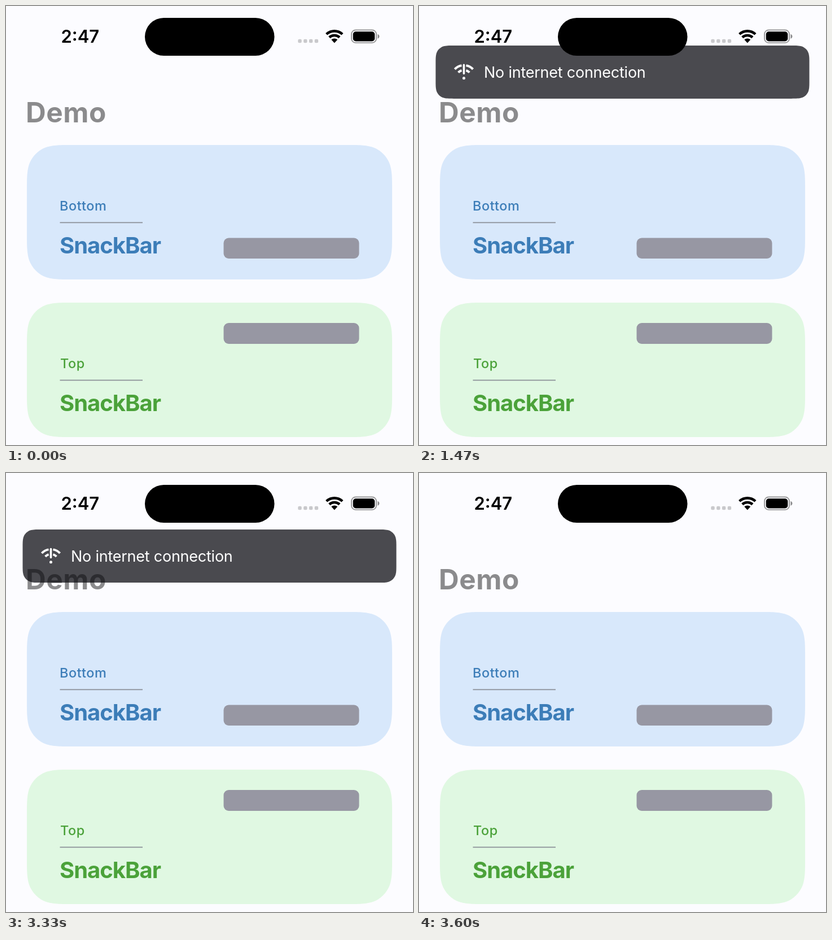
Recreate the animation shown at these times as an HTML page. Size 721 by 777 pixels, loop 3670 ms.

```html
<!DOCTYPE html>
<html lang="en">
<head>
<meta charset="utf-8">
<title>SnackBar demo</title>
<style>
  html, body { margin: 0; width: 100%; height: 100%; overflow: hidden; background: #fcfcff; }
  svg { display: block; width: 721px; height: 777px; font-family: Inter, Roboto, sans-serif; }
  .title { font-size: 49.5px; font-weight: 700; letter-spacing: .5px; fill: #8b8b8d; }
  .label { font-size: 23.5px; font-weight: 500; letter-spacing: .5px; }
  .name { font-size: 40px; font-weight: 700; letter-spacing: -1px; }
  .clock { font-size: 31px; font-weight: 600; }
  .message { font-size: 27px; letter-spacing: -.24px; fill: #fff; }
  .rule { stroke: #8b9098; stroke-width: 1.7; }
  .block { fill: #9797a3; }
  .blue { fill: #3c7db8; }
  .green { fill: #4ba23a; }
  .arc { fill: none; }
</style>
</head>
<body>
<svg viewBox="0 0 721 777">
  <text class="title" x="35" y="205.5">Demo</text>

  <g transform="translate(37 246)">
    <path class="card" fill="#d8e8fb"/>
    <text class="label blue" x="58" y="115.5">Bottom</text>
    <path class="rule" d="M58.5 137.3H205"/>
    <text class="name blue" x="58" y="192">SnackBar</text>
    <rect class="block" x="348.5" y="164.5" width="240" height="36.5" rx="9"/>
  </g>

  <g transform="translate(37 525)">
    <path class="card" fill="#e0f8e2"/>
    <text class="label green" x="59" y="115.5">Top</text>
    <path class="rule" d="M58.5 137.3H205"/>
    <text class="name green" x="58" y="192">SnackBar</text>
    <rect class="block" x="348.5" y="36" width="240" height="37" rx="9"/>
  </g>

  <g id="bar">
    <path id="barShape" fill="rgba(10,10,15,.735)" transform="translate(29.5 0)"/>
    <g id="offline" stroke="#fff" stroke-width="4">
      <path d="M79.5 34.5V49.5" stroke-width="3.6" stroke-linecap="round"/>
      <circle cx="79.5" cy="57.8" r="2.5" fill="#fff" stroke="none"/>
    </g>
    <text class="message" x="115" y="57">No internet connection</text>
  </g>

  <text class="clock" x="97.5" y="65">2:47</text>
  <rect x="246" y="21" width="229.5" height="67" rx="33.5"/>
  <g id="signal" fill="rgba(0,0,0,.2)"></g>
  <g id="wifi" stroke="#000" stroke-width="4.6"></g>
  <g>
    <rect x="612" y="42.5" width="44" height="22.6" rx="7.5" fill="none" stroke="rgba(0,0,0,.4)" stroke-width="1.9"/>
    <rect x="614.7" y="45.2" width="38.6" height="17.2" rx="5"/>
    <path d="M658.4 49.7Q661.4 51 661.4 53.8T658.4 57.9Z" fill="rgba(0,0,0,.45)"/>
  </g>
</svg>

<script>
const $ = id => document.getElementById(id);

function add(parent, tag, attrs) {
  const el = document.createElementNS('http://www.w3.org/2000/svg', tag);
  for (const key in attrs) el.setAttribute(key, attrs[key]);
  parent.append(el);
}

// Rectangle with continuous-curvature corners
function squircle(w, h, r) {
  const half = [[1.5287, 0], [1.0885, 0], [.8684, 0], [.6315, .0749], [.3728, .1691]];
  const corner = [...half, ...half.map(([a, b]) => [b, a]).reverse()];
  const side = (flipX, flipY) => {
    const pts = corner.map(([a, b]) => [flipX ? w - a * r : a * r, flipY ? h - b * r : b * r]);
    return flipX === flipY ? pts.reverse() : pts;
  };
  const draw = pts => `${pts[0]}C${pts.slice(1).join(' ')}`;
  return 'M' + [side(0, 0), side(1, 0), side(1, 1), side(0, 1)].map(draw).join('L') + 'Z';
}

// Angles in degrees, clockwise from straight up
function arc(cx, cy, r, from, to) {
  const at = deg => {
    const a = deg * Math.PI / 180;
    return [cx + r * Math.sin(a), cy - r * Math.cos(a)];
  };
  return `M${at(from)}A${r} ${r} 0 0 1 ${at(to)}`;
}

for (const card of document.querySelectorAll('.card')) card.setAttribute('d', squircle(647, 238, 54));
$('barShape').setAttribute('d', squircle(662, 94, 21));

for (let i = 0; i < 4; i++)
  add($('signal'), 'rect', { x: 517.3 + i * 9.8, y: 58.8, width: 6.4, height: 6.4, rx: 2 });

for (const r of [21.2, 13.6])
  add($('wifi'), 'path', { class: 'arc', d: arc(581.8, 65.6, r, -42, 42) });
add($('wifi'), 'path', { stroke: 'none', d: arc(581.8, 65.6, 8.2, -42, 42) + 'L581.8 65.6Z' });

for (const [r, gap] of [[22, 10.5], [13.5, 17]]) {
  add($('offline'), 'path', { class: 'arc', d: arc(79.5, 57, r, -47, -gap) });
  add($('offline'), 'path', { class: 'arc', d: arc(79.5, 57, r, gap, 47) });
}

const LOOP = 3670, FPS = 15, REST = 145, HIDDEN = -94;
const clamp = v => Math.min(1, Math.max(0, v));
const smooth = v => v * v * (3 - 2 * v);

// The bar moves in held steps of 1/15 s
function barY(ms) {
  const tick = Math.floor((ms + 4) * FPS / 1000);
  if (tick < 47) return HIDDEN + (REST - HIDDEN) * smooth(clamp((tick - 18.645) / 5.355));
  return REST - 245 * clamp((tick - 47) / 7) ** 2;
}

function frame() {
  const y = barY(performance.now() % LOOP);
  $('bar').setAttribute('transform', `translate(0 ${y.toFixed(2)})`);
  requestAnimationFrame(frame);
}
frame();
</script>
</body>
</html>
```
